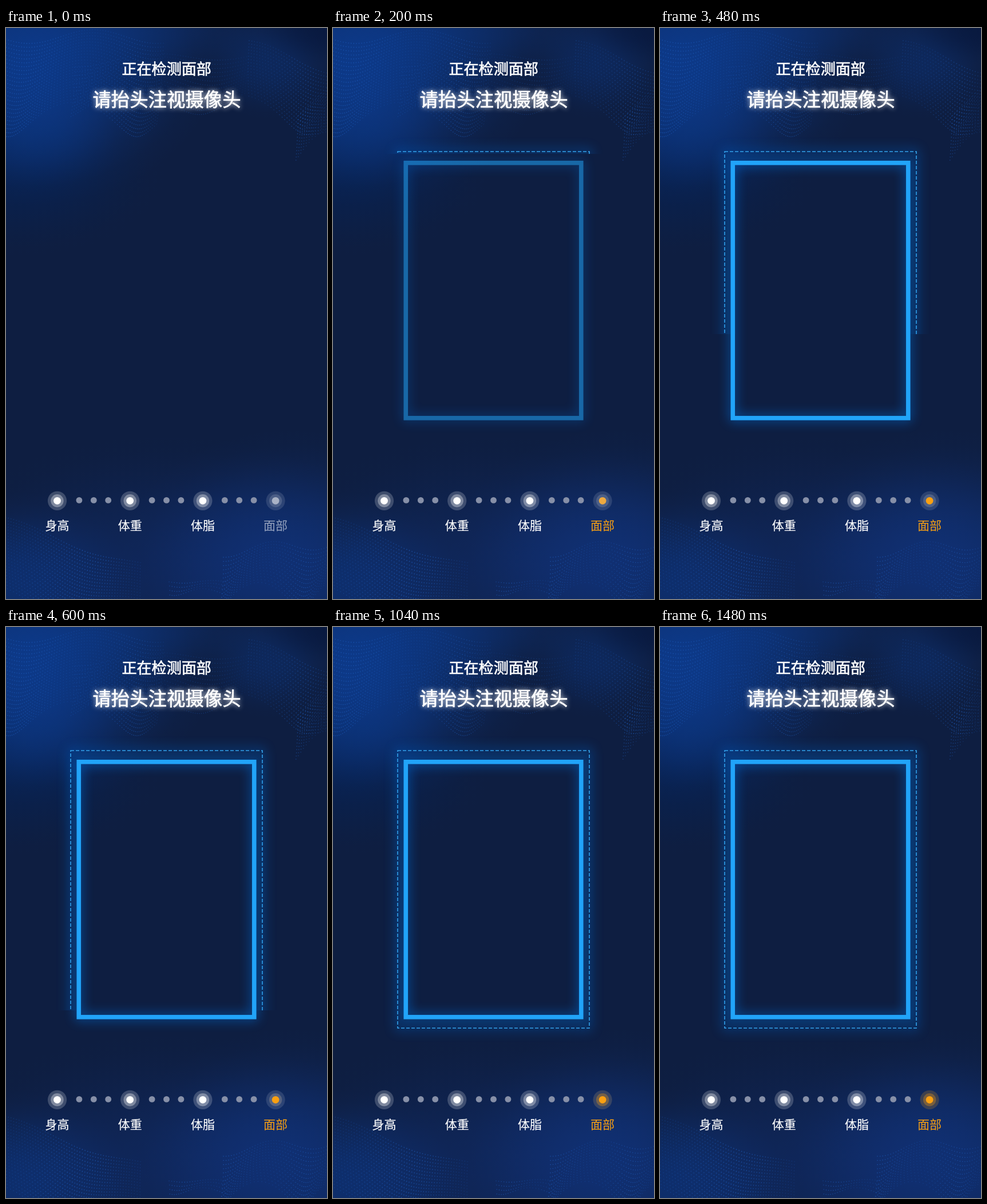
An HTML page with a canvas for the animation above (1.52 s loop, 561x998 px).

```html
<!DOCTYPE html>
<html lang="zh-CN">
<head>
<meta charset="utf-8">
<title>面部检测</title>
<style>
html, body { margin: 0; width: 100%; height: 100%; overflow: hidden; background: #0e1e41; }
canvas, svg { position: absolute; left: 0; top: 0; width: 561px; height: 998px; display: block; }
text { font-family: "Noto Sans CJK SC", "Noto Sans CJK", sans-serif; text-anchor: middle; fill: #fff; }
.title { stroke: #fff; stroke-width: .7px; }
.label { font-size: 21px; stroke-width: .2px; }
</style>
</head>
<body>
<canvas id="bg" width="561" height="998"></canvas>
<svg viewBox="0 0 561 998">
  <defs>
    <filter id="soft" filterUnits="userSpaceOnUse" x="0" y="100" width="561" height="720">
      <feGaussianBlur stdDeviation="10"/>
    </filter>
    <filter id="halo" filterUnits="userSpaceOnUse" x="100" y="80" width="361" height="90">
      <feGaussianBlur stdDeviation="4"/>
    </filter>
    <clipPath id="wipe"><rect id="wipeBox" width="561" height="0"/></clipPath>
  </defs>

  <text class="title" x="280.7" y="80.5" font-size="26.1">正在检测面部</text>
  <g class="title" font-size="32.4">
    <text x="281" y="137" filter="url(#halo)" opacity=".85">请抬头注视摄像头</text>
    <text x="281" y="137">请抬头注视摄像头</text>
  </g>

  <g clip-path="url(#wipe)" fill="none">
    <rect x="113" y="216" width="335" height="485" stroke="#0b6fe0" stroke-width="6" filter="url(#soft)" opacity=".6"/>
    <rect x="113" y="216" width="335" height="485" stroke="#35a3ec" stroke-width="1.6" stroke-dasharray="6 3"/>
  </g>
  <g id="frame" fill="none" opacity="0">
    <rect x="127" y="236" width="307" height="446" stroke="#0b7cf0" stroke-width="8" filter="url(#soft)" opacity=".75"/>
    <rect x="127.25" y="235.75" width="306.5" height="446" stroke="#21a4f9" stroke-width="7.6"/>
  </g>
  <g id="steps"></g>
</svg>
<script>
const LOOP = 1520, TICK = 40;
const $ = id => document.getElementById(id);
const clamp = v => Math.max(0, Math.min(1, v));
const ramp = (t, from, to) => clamp((t - from) / (to - from));
const mix = (a, b, k) => `rgba(${a.map((v, i) => (v + (b[i] - v) * k).toFixed(3))})`;

function add(tag, attrs, text) {
  const el = document.createElementNS("http://www.w3.org/2000/svg", tag);
  for (const k in attrs) el.setAttribute(k, attrs[k]);
  if (text) el.textContent = text;
  return $("steps").appendChild(el);
}

// Backdrop: soft lights with rippling sheets of dots in the corners.
const ctx = $("bg").getContext("2d");

function light(x, y, rx, ry, alpha, rgb = "12,66,160") {
  ctx.save();
  ctx.translate(x, y);
  ctx.scale(rx, ry);
  const g = ctx.createRadialGradient(0, 0, 0, 0, 0, 1);
  for (let k = 0; k <= 1; k += 1 / 8)
    g.addColorStop(k, `rgba(${rgb},${alpha * (1 - k * k) ** 2})`);
  ctx.fillStyle = g;
  ctx.fillRect(-1, -1, 2, 2);
  ctx.restore();
}

// Rows of dots; the ripple deepens and drifts from row to row.
function sheet({ x, y, w, h, amp, waves, phase, slope = 0, alpha = .5 }) {
  const rows = Math.round(h / 6), cols = Math.round(w / 4.6);
  for (let r = 0; r <= rows; r++) {
    const k = r / rows;
    for (let c = 0; c <= cols; c++) {
      const u = c / cols;
      const a = 2 * Math.PI * waves * u + phase + k;
      const px = x + w * u + amp * .4 * k * Math.cos(a);
      const py = y + h * k + slope * u + amp * (.4 + .6 * k) * Math.sin(a);
      const fade = Math.min(1, 4 * (1 - u) + .1) * (.55 + .45 * Math.sin(a));
      ctx.fillStyle = `rgba(36,108,214,${alpha * (.35 + .65 * Math.abs(fade))})`;
      ctx.beginPath();
      ctx.arc(px, py, .8, 0, 7);
      ctx.fill();
    }
  }
}

function backdrop() {
  ctx.fillStyle = "#0e1e41";
  ctx.fillRect(0, 0, 561, 998);
  light(20, 250, 260, 150, .5, "4,36,92");
  light(40, 60, 330, 250, .75);
  light(60, 180, 150, 110, .2);
  light(250, 0, 240, 90, .25);
  light(460, 60, 130, 100, .28);
  light(560, 0, 130, 70, .6, "5,22,62");
  light(500, 930, 300, 230, .42, "18,68,170");
  light(20, 970, 230, 160, .42);
  light(280, 940, 420, 230, .3, "18,56,140");

  sheet({ x: -5, y: 15, w: 280, h: 145, amp: 30, waves: 1.25, phase: .3 });
  sheet({ x: 120, y: 60, w: 305, h: 80, amp: 22, waves: 1.2, phase: 1.4, slope: -15, alpha: .28 });
  sheet({ x: 425, y: 25, w: 140, h: 110, amp: 16, waves: .8, phase: 3.6, slope: 50 });
  sheet({ x: 510, y: 150, w: 55, h: 75, amp: 10, waves: .5, phase: 1.5, slope: -45 });
  sheet({ x: -5, y: 860, w: 240, h: 135, amp: 18, waves: 1, phase: 4, slope: 80, alpha: .6 });
  sheet({ x: 285, y: 968, w: 100, h: 18, amp: 6, waves: 1, phase: 0 });
  sheet({ x: 380, y: 915, w: 185, h: 85, amp: 26, waves: 1.2, phase: 1.3, slope: -15 });
}

// Progress row
const WHITE = [255, 255, 255], ORANGE = [250, 160, 18];
const RADII = [16.6, 11.2, 6.4];
const DONE = [.2, .34, 1], OFF = [.12, .15, .52], ON = [.2, .32, 1];
let rings, label;

["身高", "体重", "体脂", "面部"].forEach((name, i) => {
  const x = 89.5 + 127.2 * i;
  rings = RADII.map((r, n) =>
    add("circle", { cx: x, cy: 826.3, r, fill: `rgba(${WHITE},${DONE[n]})` }));
  label = add("text", { class: "label", x, y: 877, stroke: "#fff" }, name);
  for (let n = 0; n < 3 && i < 3; n++)
    add("circle", { cx: x + 38.4 + 25.4 * n, cy: 825.4, r: 5.4, fill: "#8790a8" });
});
label.setAttribute("stroke", "none");

function draw(t) {
  $("frame").setAttribute("opacity", ramp(t, 0, 360));
  $("wipeBox").setAttribute("height", Math.max(0, Math.min(998, 1.125 * t - 5)));
  const lit = [ramp(t, 800, 1200), ramp(t, 440, 960), ramp(t, 0, 240)];
  rings.forEach((c, n) =>
    c.setAttribute("fill", mix([...WHITE, OFF[n]], [...ORANGE, ON[n]], lit[n])));
  label.style.fill = mix([...WHITE, .56], [...ORANGE, 1], ramp(t, 0, 130));
}

backdrop();
function loop(now) {
  draw(Math.floor(now % LOOP / TICK) * TICK);
  requestAnimationFrame(loop);
}
draw(0);
requestAnimationFrame(loop);
</script>
</body>
</html>
```
